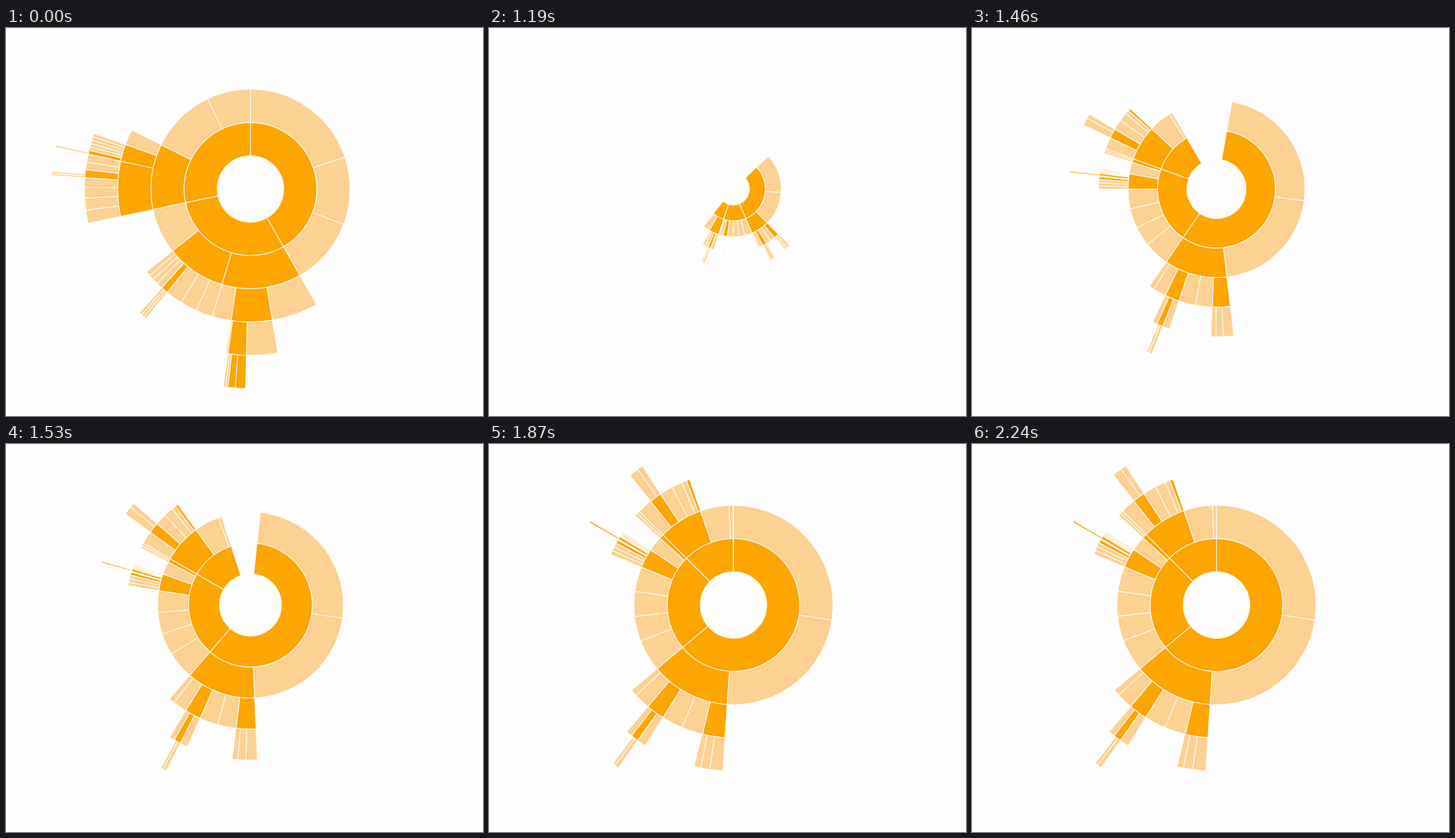
An HTML page with a canvas that plays this animation: 734 by 596 pixels, repeating every 2.38 s.

```html
<!DOCTYPE html>
<html lang="en">
<head>
<meta charset="utf-8">
<title>Sunburst</title>
<style>
  html, body { margin: 0; width: 100%; height: 100%; overflow: hidden; background: #fefefe; }
  canvas { display: block; }
</style>
</head>
<body>
<canvas id="stage" width="734" height="596"></canvas>
<script>
const ctx = document.getElementById('stage').getContext('2d');
const LOOP = 2380, SWITCH = 1190, GROW = 850;
const CX = 376.2, CY = 247.3, RING = 51.1;
const BRANCH = '#fda500', LEAF = '#fcd191';

// A run of leaves whose spans start at `span` degrees and shrink by `ratio`.
const fan = (count, span, ratio = 1) =>
  Array.from({ length: count }, (_, i) => span * ratio ** i);

// A leaf is its span in degrees; a branch is [span, children].
const before = [
  [150.2, [71.4, ...fan(2, 39.4)]],
  [107.9, [
    [46.5, [20.3, [17.9, [10.9, [6.4, [[3], [2.1], ...fan(2, 0.7)]], 0.6]], 8.2]],
    [34.9, [...fan(3, 7.4), [3.1, fan(3, 1)], ...fan(4, 2.7, 0.92)]],
    26.5
  ]],
  [101.9, [
    [38.2, [
      [24, [...fan(4, 4.6, 0.9), [2.8, fan(2, 0.6)], ...fan(2, 2.65)]],
      [7.5, [[1.4, [0.6]], ...fan(5, 1.2)]],
      6.8
    ]],
    38.3, 25.4
  ]]
];
const after = [
  [230.3, [98.7, 85, [46.6, [
    [9.9, fan(3, 4.6, 0.7)],
    ...fan(2, 9.3),
    [8.1, [3.2, [2.7, fan(2, 1.2, 0.7)], 2.2]],
    7.1, 2.9
  ]]]],
  [84.7, [
    18.7, ...fan(3, 14.5),
    [11.3, [...fan(3, 1.8), [1.5], 0.5, [1.3, [[0.65]]], ...fan(4, 0.6)]],
    8.6,
    [2.6, fan(2, 1.3)]
  ]],
  [45, [
    [25.9, [6.5, [5.4, [3.4, 2]], 5.7, 4.7, 2.2, [1.4]]],
    16.8, 2.3
  ]]
];

function slice(ring, from, to, colour, size) {
  // Angles open up around the three o'clock direction.
  const turn = deg => (deg - 90) * Math.PI / 180 * size;
  const r = RING * size * ring;
  ctx.beginPath();
  ctx.arc(CX, CY, r, turn(from), turn(to));
  ctx.arc(CX, CY, r + RING * size, turn(to), turn(from), true);
  ctx.closePath();
  ctx.fillStyle = colour;
  ctx.fill();
  ctx.stroke();
}

function drawNodes(nodes, ring, from, size) {
  for (const node of nodes) {
    const isBranch = Array.isArray(node);
    const [span, children = []] = isBranch ? node : [node];
    slice(ring, from, from + span, isBranch ? BRANCH : LEAF, size);
    drawNodes(children, ring + 1, from, size);
    from += span;
  }
}

// Quartic ease-out, already under way when the new chart appears.
const growth = ms => 1 - (Math.max(0, GROW - ms) / 1000) ** 4;

const start = performance.now();
function frame() {
  const t = (performance.now() - start) % LOOP;
  ctx.fillStyle = '#fefefe';
  ctx.fillRect(0, 0, 734, 596);
  ctx.strokeStyle = '#fff';
  ctx.lineWidth = 1.1;
  if (t < SWITCH) drawNodes(before, 1, 0, 1);
  else drawNodes(after, 1, 0, growth(t - SWITCH));
  requestAnimationFrame(frame);
}
frame();
</script>
</body>
</html>
```
